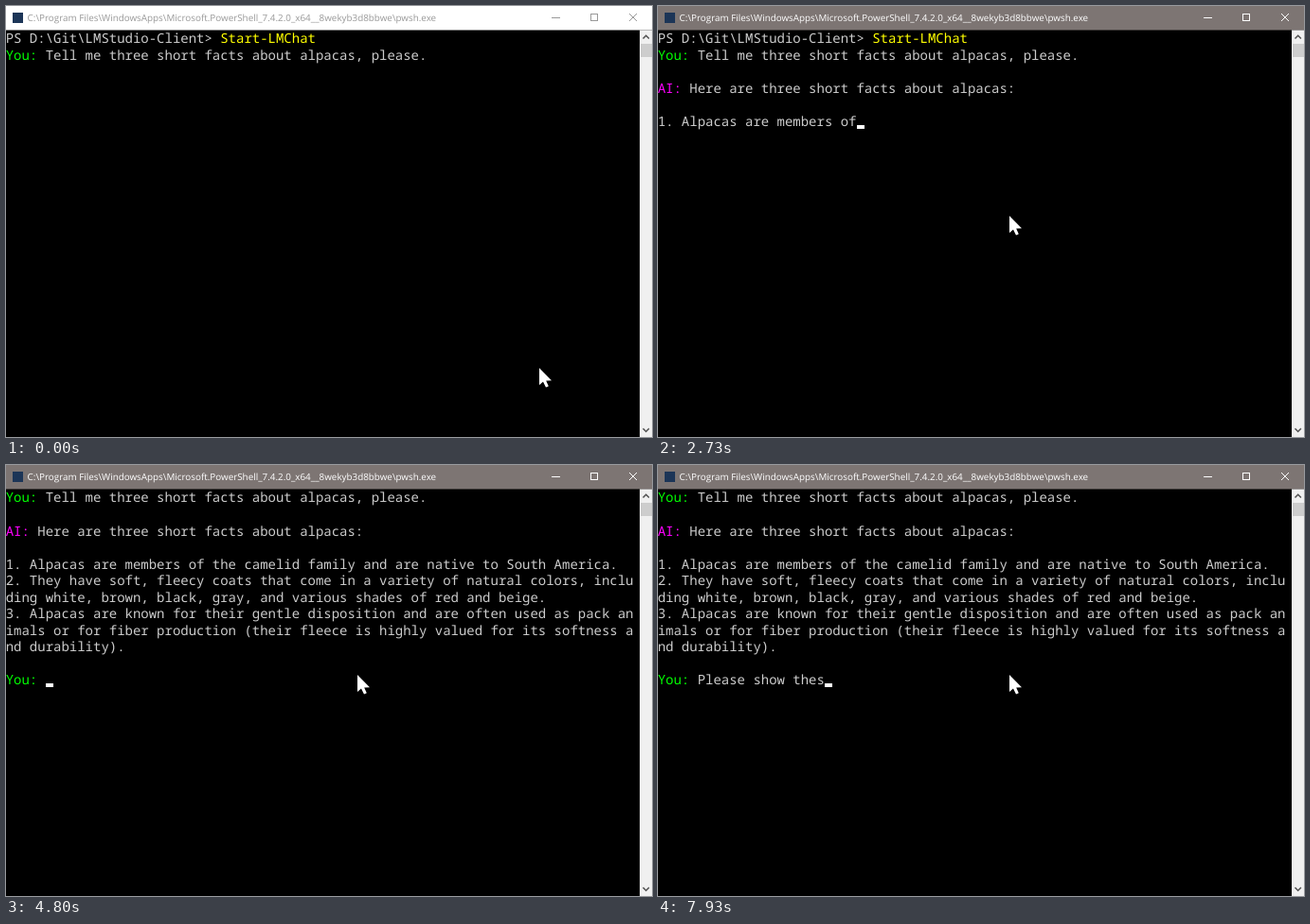
An HTML page with a canvas that plays this animation: 682x456 px, repeating every 8000 ms.

```html
<!DOCTYPE html>
<html lang="en">
<head>
<meta charset="utf-8">
<title>Terminal chat</title>
<style>
  html, body { margin: 0; width: 100%; height: 100%; overflow: hidden; background: #000; }
  canvas { display: block; }
</style>
</head>
<body>
<canvas id="stage" width="682" height="456"></canvas>
<script>
const ctx = document.getElementById('stage').getContext('2d');
const LOOP = 8000, TICK = 200 / 3;
const COLS = 79, CELL_W = 8.39, CELL_H = 17.55, TOP = 26;
const GREY = '#cccccc', GREEN = '#00ff00', YELLOW = '#ffff00', PINK = '#ff00ff';

const TITLE = 'C:\\Program Files\\WindowsApps\\Microsoft.PowerShell_7.4.2.0_x64__8wekyb3d8bbwe\\pwsh.exe';
const QUESTION = 'Tell me three short facts about alpacas, please.';
const NEXT = 'Please show thes';
const ANSWER = 'Here are three short facts about alpacas:\n\n' +
  '1. Alpacas are members of the camelid family and are native to South America.\n' +
  '2. They have soft, fleecy coats that come in a variety of natural colors, ' +
  'including white, brown, black, gray, and various shades of red and beige.\n' +
  '3. Alpacas are known for their gentle disposition and are often used as pack ' +
  'animals or for fiber production (their fleece is highly valued for its softness ' +
  'and durability).';

const FOCUS_AT = 600, ENTER_AT = 1390, DONE_AT = 4395, REDRAW_AT = 4460;
const endOf = part => ANSWER.indexOf(part) + part.length;
const STREAM = [
  [2350, 0],
  [2720, endOf('members of')],
  [3790, endOf('3. Alpacas are')],
  [4390, ANSWER.length]
];

const clamp = v => Math.max(0, Math.min(1, v));

function interpolate(keys, t) {
  let value = keys[0][1];
  for (let i = 1; i < keys.length; i++) {
    const [t0, a] = keys[i - 1], [t1, b] = keys[i];
    if (t >= t0) value = a + (b - a) * clamp((t - t0) / (t1 - t0));
  }
  return value;
}

// The reply arrives in whole words.
function streamed(t) {
  const n = Math.floor(interpolate(STREAM, t));
  const part = ANSWER.slice(0, n);
  const next = ANSWER[n];
  return (next && /\S/.test(next) ? part.replace(/\S*$/, '') : part).trimEnd();
}

function screenRuns(t) {
  const runs = [];
  if (t < REDRAW_AT) {
    runs.push(['PS D:\\Git\\LMStudio-Client> ', GREY], ['Start-LMChat\n', YELLOW]);
  }
  runs.push(['You: ', GREEN], [QUESTION, GREY]);
  if (t >= ENTER_AT) runs.push(['\n\nAI: ', PINK], [streamed(t), GREY]);
  if (t >= DONE_AT) runs.push(['\n', GREY]);
  if (t >= REDRAW_AT) {
    const typed = Math.max(0, Math.floor((t - 6050) / 115));
    runs.push(['\nYou: ', GREEN], [NEXT.slice(0, typed), GREY]);
  }
  return runs;
}

function caretVisible(t) {
  if (t < 860) return false;
  if (t > ENTER_AT && t < 2350) return (t - ENTER_AT) % 1060 < 530;
  return t < 5200 || t >= 5730;
}

function drawScreen(t) {
  ctx.font = '14px "Noto Sans Mono", "DejaVu Sans Mono", monospace';
  let col = 0, row = 0;
  for (const [text, color] of screenRuns(t)) {
    ctx.fillStyle = color;
    for (const ch of text) {
      if (ch === '\n') { col = 0; row++; continue; }
      if (col === COLS) { col = 0; row++; }
      ctx.fillText(ch, col * CELL_W - 0.3, TOP + row * CELL_H + 13.4);
      col++;
    }
  }
  if (caretVisible(t)) {
    ctx.fillStyle = '#ffffff';
    ctx.fillRect(Math.round(col * CELL_W), Math.round(TOP + row * CELL_H + 12.4), 8, 4);
  }
}

function strokePath(points, color, width) {
  ctx.strokeStyle = color;
  ctx.lineWidth = width;
  ctx.beginPath();
  points.forEach(([x, y]) => ctx.lineTo(x, y));
  ctx.stroke();
}

function drawTitleBar(active) {
  const ink = active ? '#ffffff' : '#999999';
  ctx.fillStyle = active ? '#7d7573' : '#ffffff';
  ctx.fillRect(0, 0, 682, 25.5);
  ctx.fillStyle = '#1c3557';
  ctx.fillRect(7, 7, 11, 11);

  ctx.font = '9.86px "Open Sans", "Noto Sans", sans-serif';
  ctx.fillStyle = ink;
  ctx.fillText(TITLE, 22.6, 16.4);

  strokePath([[576, 12.5], [585, 12.5]], ink, 1);
  ctx.strokeRect(617.5, 8.5, 7, 7);
  strokePath([[658, 8], [666, 16]], ink, 1);
  strokePath([[666, 8], [658, 16]], ink, 1);
}

function drawScrollbar() {
  ctx.fillStyle = '#f0f0f0';
  ctx.fillRect(669, 25.5, 13, 430.5);
  ctx.fillStyle = '#cdcdcd';
  ctx.fillRect(670, 40, 12, 14);
  strokePath([[672.5, 34.5], [675.7, 31.3], [678.9, 34.5]], '#505050', 1.5);
  strokePath([[672.5, 447], [675.7, 450.2], [678.9, 447]], '#505050', 1.5);
}

function drawPointer(t) {
  const p = clamp((t - 70) / 460);
  const ease = p * p * (3 - 2 * p);
  const shape = [[0, 0], [0, 18], [4, 14.4], [7, 20.4], [9.8, 19.3], [7.2, 13.4], [13, 13.2]];
  ctx.save();
  ctx.translate(563 - 192 * ease, 383 - 161 * ease);
  ctx.beginPath();
  shape.forEach(([x, y]) => ctx.lineTo(x, y));
  ctx.closePath();
  ctx.strokeStyle = '#000000';
  ctx.lineWidth = 1.5;
  ctx.stroke();
  ctx.fillStyle = '#ffffff';
  ctx.fill();
  ctx.restore();
}

function draw(now) {
  // Small lead keeps rounded frame times on the right tick.
  const t = Math.floor(((now % LOOP) + 5) / TICK) * TICK % LOOP;
  ctx.textRendering = 'geometricPrecision';
  ctx.fillStyle = '#000000';
  ctx.fillRect(0, 0, 682, 456);
  drawScreen(t);
  drawTitleBar(t >= FOCUS_AT);
  drawScrollbar();
  drawPointer(t);
}

const start = performance.now();
function frame() {
  draw(performance.now() - start);
  requestAnimationFrame(frame);
}
frame();
</script>
</body>
</html>
```
